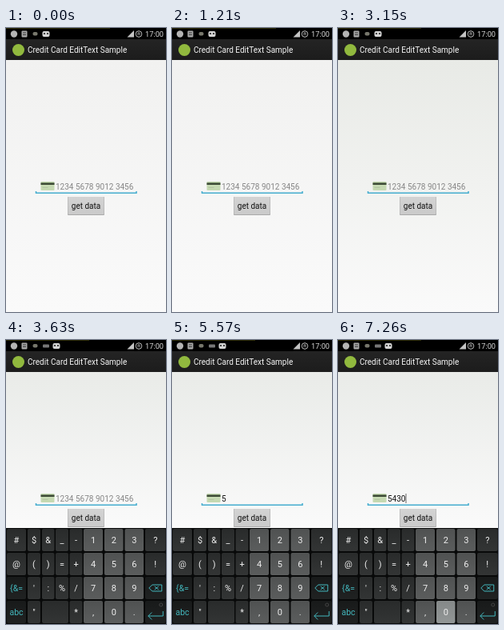
An HTML page with a canvas that plays this animation: 200x355 px, repeating every 8 s.

```html
<!DOCTYPE html>
<html lang="en">
<head>
<meta charset="utf-8">
<title>Credit card input</title>
<style>
  html, body { margin: 0; width: 100%; height: 100%; overflow: hidden; background: #000; }
  canvas { display: block; width: 200px; height: 355px; }
</style>
</head>
<body>
<canvas width="200" height="355"></canvas>
<script>
const ctx = document.querySelector('canvas').getContext('2d');
const LOOP = 8000;
const HINT = '1234 5678 9012 3456';
const TEAL = '#43b7bd';

const steps = [
  { at: 0, top: '#f1f1f0', edge: 130 },
  { at: 2420, top: '#e8eae6', edge: 104 },
  { at: 3630, top: '#e9ebe8', edge: 104, keyboard: true },
  { at: 4840, top: '#e9ebe8', edge: 104, keyboard: true, value: '5' },
  { at: 6050, top: '#e9ebe8', edge: 104, keyboard: true, value: '54', cursor: true, pressed: '4' },
  { at: 7260, top: '#e9ebe8', edge: 104, keyboard: true, value: '5430', cursor: true, pressed: '0' }
];

// Column edges, left and right
const columns = [[1, 25], [27, 43], [45, 60.5], [62, 78], [79.5, 95.5],
  [97, 121], [123, 146.5], [148.5, 172], [174, 199.5]];
const rows = [
  ['#', '$', '&', '_', '-', '1', '2', '3', '?'],
  ['@', '(', ')', '=', '+', '4', '5', '6', '!'],
  ['{&=', "'", ':', '%', '/', '7', '8', '9', 'back'],
  ['abc', '"', 'space', null, '*', ',', '0', '.', 'enter']
];
const functionKeys = ['{&=', 'abc', 'back', 'enter'];

function rect(x, y, w, h, fill) {
  ctx.fillStyle = fill;
  ctx.fillRect(x, y, w, h);
}

function round(x, y, w, h, r, fill) {
  ctx.fillStyle = fill;
  ctx.beginPath();
  ctx.roundRect(x, y, w, h, r);
  ctx.fill();
}

function circle(x, y, r, fill) {
  ctx.fillStyle = fill;
  ctx.beginPath();
  ctx.arc(x, y, r, 0, Math.PI * 2);
  ctx.fill();
}

function ring(x, y, r, color) {
  ctx.strokeStyle = color;
  ctx.lineWidth = 1;
  ctx.beginPath();
  ctx.arc(x, y, r, 0, Math.PI * 2);
  ctx.stroke();
}

function line(points, color, width = 1) {
  ctx.strokeStyle = color;
  ctx.lineWidth = width;
  ctx.beginPath();
  points.forEach(([x, y]) => ctx.lineTo(x, y));
  ctx.stroke();
}

function text(label, x, y, size, color, align = 'left') {
  ctx.font = `${size}px Roboto, sans-serif`;
  ctx.textAlign = align;
  ctx.fillStyle = color;
  ctx.fillText(label, x, y);
}

function vertical(y0, y1, from, to) {
  const g = ctx.createLinearGradient(0, y0, 0, y1);
  g.addColorStop(0, from);
  g.addColorStop(1, to);
  return g;
}

function drawStatusBar({ keyboard, edge }) {
  rect(0, 0, 200, 14, '#000');
  rect(0, 0, edge, 1, '#2c2b08');
  circle(10, 7.5, 4.2, '#b4b4b4');
  // Notifications
  round(19.5, 3.5, 7, 8, 1, '#a8a8a8');
  rect(21, 5.5, 4, 1, '#333');
  rect(21, 8, 4, 1, '#333');
  round(33.5, 5, 6, 4.5, 2, '#77776c');
  if (keyboard) round(46, 5.5, 8, 4, 1, '#777');
  const face = keyboard ? 63 : 50;
  round(face - 4.5, 4, 9, 7, 2, '#d5d5d5');
  circle(face - 2, 7, 1.1, '#222');
  circle(face + 2, 7, 1.1, '#222');
  // Signal and battery
  ctx.fillStyle = '#c4c4c4';
  ctx.beginPath();
  ctx.moveTo(151.5, 11.5);
  ctx.lineTo(160, 11.5);
  ctx.lineTo(160, 3);
  ctx.fill();
  ring(166, 7.5, 3.8, '#bdbdbd');
  line([[165, 9], [165, 6], [167, 6], [167, 9]], '#999');
  text('17:00', 197, 11, 9.2, '#d8d8d8', 'right');
}

function drawActionBar() {
  rect(0, 14, 200, 26, vertical(14, 40, '#242424', '#1c1c1c'));
  circle(15.5, 27.5, 7.5, '#91b93e');
  text('Credit Card EditText Sample', 27, 31, 10, '#f5f5f5');
}

function drawField({ value, cursor }) {
  round(43.5, 192, 17, 11, 1, '#c5d9b2');
  rect(43.5, 193.5, 17, 2.5, '#3b4934');
  rect(45.5, 199, 7, 1, '#b3c6a2');
  text(value || HINT, 62, 201.5, 10, value ? '#111' : '#858585');
  if (cursor) rect(62 + ctx.measureText(value).width, 192, 1, 12, '#666');
  line([[37.5, 204], [37.5, 206.25], [163, 206.25], [163, 204]], '#45adcf', 1.5);
}

function drawButton() {
  round(77, 211, 46, 23, 1, '#a9a9a9');
  round(77.5, 211, 45, 22, 1, vertical(211, 233, '#d3d3d3', '#cacaca'));
  text('get data', 100, 226, 10, '#111', 'center');
}

function drawBackspace(x, y) {
  line([[x - 8, y], [x - 4, y - 4], [x + 8, y - 4], [x + 8, y + 4],
    [x - 4, y + 4], [x - 8, y]], TEAL);
  line([[x - 1, y - 2], [x + 4, y + 2]], TEAL);
  line([[x - 1, y + 2], [x + 4, y - 2]], TEAL);
}

function drawEnter(x, y) {
  ring(x + 7, y - 8, 2, '#444');
  line([[x + 9.5, y], [x + 9.5, y + 6], [x - 9, y + 6]], TEAL);
  line([[x - 4.5, y + 1.5], [x - 9, y + 6], [x - 4.5, y + 10.5]], TEAL);
}

function keyFill(label, column, pressed) {
  if (pressed) return ['#858989', '#929696'];
  if (functionKeys.includes(label)) return ['#181a1a', '#202222'];
  if (column > 4 && column < 8) return ['#505252', '#5b5d5d'];
  return ['#292b2b', '#333535'];
}

function drawKey(label, column, y, pressed) {
  const [left, right] = columns[column];
  const end = label === 'space' ? columns[column + 1][1] : right;
  const x = (left + end) / 2;
  round(left, y, end - left, 28, 2, vertical(y, y + 28, ...keyFill(label, column, pressed)));
  if (label === 'back') drawBackspace(x, y + 14);
  else if (label === 'enter') drawEnter(x, y + 13);
  else if (label !== 'space') {
    const special = label.length > 1;
    text(label, x, y + 18, special ? 10.5 : 11, special ? TEAL : '#eee', 'center');
  }
}

function drawKeyboard(pressed) {
  rect(0, 235, 200, 120, '#080909');
  rows.forEach((row, r) => row.forEach((label, c) => {
    if (label) drawKey(label, c, 236 + r * 30, label === pressed);
  }));
}

function draw(now) {
  const time = now % LOOP;
  const state = steps.findLast(step => step.at <= time);
  rect(0, 40, 200, 315, vertical(40, state.keyboard ? 235 : 355, state.top, '#fafafa'));
  drawStatusBar(state);
  drawActionBar();
  drawField(state);
  drawButton();
  if (state.keyboard) drawKeyboard(state.pressed);
}

const start = performance.now();
function tick() {
  draw(performance.now() - start);
  requestAnimationFrame(tick);
}
tick();
</script>
</body>
</html>
```
